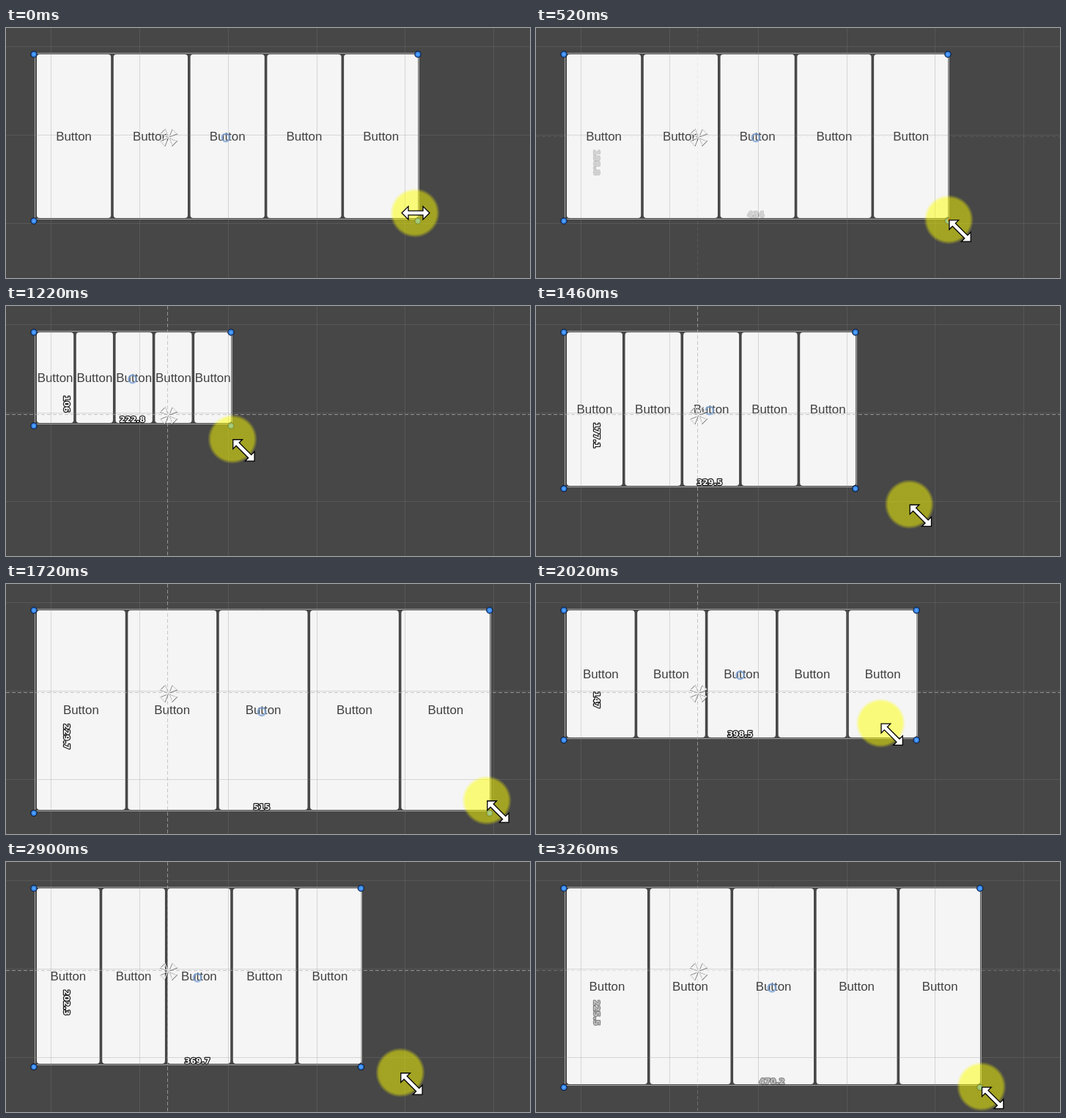
Write an HTML page with a canvas that moves like this. It is 715 px wide and 342 px high and loops after 3.3 s.

```html
<!DOCTYPE html>
<html lang="en">
<head>
<meta charset="utf-8">
<title>Resizing a row of buttons</title>
<style>
html, body { margin: 0; width: 100%; height: 100%; overflow: hidden; background: #474747; }
canvas { display: block; }
</style>
</head>
<body>
<canvas id="stage" width="715" height="342"></canvas>
<script>
const W = 715, H = 342, LOOP = 3300, STEP = 20;
const ctx = document.getElementById('stage').getContext('2d');

const LEFT = 38, TOP = 36, SCALE = 1.2075;
const PRESS = 500, LAG = 60;   // the panel follows the pointer a little late

// Pointer poses: time, x, y
const PATH = [
  [0, 558, 253], [200, 564, 263], [PRESS, 564, 263], [740, 495.4, 205],
  [1160, 309, 163], [1220, 309, 182], [1660, 661.9, 312.4], [1720, 656, 296],
  [2340, 252.9, 120.8], [2400, 243, 121], [2840, 486.4, 279.3], [2900, 538, 288],
  [3160, 607.8, 307.3]
];
const LAST = PATH.length - 1;

const clamp = v => Math.min(1, Math.max(0, v));

function slope(i, k) {
  if (i < 0 || i >= LAST) return 0;
  return (PATH[i + 1][k] - PATH[i][k]) / (PATH[i + 1][0] - PATH[i][0]);
}

function tangent(i, k) {
  const a = slope(i - 1, k), b = slope(i, k);
  return a * b > 0 ? 2 * a * b / (a + b) : 0;
}

// Smooth curve through the poses that never overshoots them
function pointer(t) {
  t = Math.min(t, PATH[LAST][0]);
  let i = 0;
  while (i < LAST - 1 && t >= PATH[i + 1][0]) i++;
  const span = PATH[i + 1][0] - PATH[i][0], u = (t - PATH[i][0]) / span, v = 1 - u;
  return [1, 2].map(k =>
    v * v * (1 + 2 * u) * PATH[i][k] + u * v * v * span * tangent(i, k) +
    u * u * (3 - 2 * u) * PATH[i + 1][k] - u * u * v * span * tangent(i + 1, k));
}

function stroke(color, width) {
  ctx.strokeStyle = color;
  ctx.lineWidth = width;
  ctx.stroke();
}

function fill(color) {
  ctx.fillStyle = color;
  ctx.fill();
}

function line(x1, y1, x2, y2, color) {
  ctx.beginPath();
  ctx.moveTo(x1, y1);
  ctx.lineTo(x2, y2);
  stroke(color, 1);
}

function circle(x, y, r) {
  ctx.beginPath();
  ctx.arc(x, y, r, 0, Math.PI * 2);
}

function glow(x, y, r1, color1, r2, color2) {
  const g = ctx.createRadialGradient(x, y, r1, x, y, r2);
  g.addColorStop(0, color1);
  g.addColorStop(1, color2);
  return g;
}

function wrap(text, width) {
  const lines = [''];
  for (const c of text) {
    const last = lines.length - 1;
    if (lines[last] && ctx.measureText(lines[last] + c).width > width + 1) lines.push(c);
    else lines[last] += c;
  }
  return lines;
}

function buttons(right, bottom) {
  const gap = 3.6, x0 = 42, y1 = Math.round(bottom) - 4;
  const pitch = (right + .3 - x0 + gap) / 5, width = pitch - gap;
  ctx.font = '16.9px "Liberation Sans", Arial, sans-serif';
  ctx.textAlign = 'center';
  ctx.textBaseline = 'alphabetic';
  const lines = wrap('Button', width);
  for (let i = 0; i < 5; i++) {
    const x = x0 + i * pitch;
    ctx.beginPath();
    ctx.roundRect(x, TOP, width, y1 - TOP, 4);
    fill('#f5f5f5');
    ctx.fillStyle = '#404040';
    lines.forEach((s, n) => ctx.fillText(s, x + width / 2,
      (TOP + y1) / 2 + 5.9 + (n - (lines.length - 1) / 2) * 19.4));
  }
}

function grid() {
  const color = 'rgba(128,128,128,.27)', cell = 120.85;
  for (let x = 61.5; x < W; x += cell) line(Math.floor(x) + .5, 0, Math.floor(x) + .5, H, color);
  for (let y = 25.5; y < H; y += cell) line(0, Math.floor(y) + .5, W, Math.floor(y) + .5, color);
}

function guides() {
  const color = 'rgba(180,180,180,.7)';
  ctx.setLineDash([5, 3]);
  line(220.5, 0, 220.5, H, color);
  line(0, 148.5, W, 148.5, color);
  ctx.setLineDash([]);
}

function petals(x, y, color) {
  ctx.save();
  ctx.translate(x, y);
  ctx.rotate(Math.PI / 4);
  ctx.beginPath();
  for (let i = 0; i < 4; i++) {
    ctx.moveTo(1, 0);
    ctx.lineTo(11.5, -4.6);
    ctx.lineTo(11.5, 4.6);
    ctx.closePath();
    ctx.rotate(Math.PI / 2);
  }
  stroke(color, 1.1);
  ctx.restore();
}

function size(length, x, y, angle) {
  const text = String(+(length / SCALE).toFixed(1));
  ctx.save();
  ctx.translate(x, y);
  ctx.rotate(angle);
  ctx.font = 'bold 11px "DejaVu Sans", sans-serif';
  ctx.textBaseline = 'middle';
  ctx.lineJoin = 'round';
  ctx.lineWidth = 2.4;
  ctx.strokeStyle = '#1c1c1c';
  ctx.strokeText(text, 0, 0);
  ctx.fillStyle = '#fff';
  ctx.fillText(text, 0, 0);
  ctx.restore();
}

function handle(x, y) {
  circle(x, y, 4.2);
  fill(glow(x, y, .5, '#5aa9ff', 4.5, '#1a67d2'));
  stroke('#0d1c38', 1.1);
}

// Double arrow centred on x, y
function arrow(x, y, half, angle) {
  const side = [[half, 0], [half - 9, 9], [half - 9, 2.9]];
  ctx.save();
  ctx.translate(x, y);
  ctx.rotate(angle);
  ctx.beginPath();
  for (const s of [1, -1]) {
    side.forEach(([px, py]) => ctx.lineTo(s * px, s * py));
    side.slice(1).reverse().forEach(([px, py]) => ctx.lineTo(-s * px, s * py));
  }
  ctx.closePath();
  fill('#fff');
  stroke('#000', 1.3);
  ctx.restore();
}

function cursor(x, y, diagonal) {
  circle(x, y, 34);
  fill(glow(x, y, 29, 'rgba(255,255,0,.5)', 34, 'rgba(255,255,0,0)'));
  if (diagonal) arrow(x + 15.4, y + 15.4, 20.7, Math.PI / 4);
  else arrow(x + 1, y, 19, 0);
}

function clickRing(t) {
  const age = (t - PRESS) / 420;
  if (age <= 0 || age >= 1) return;
  circle(564, 263, 29 * age);
  stroke(`rgba(200,20,20,${clamp(2.4 * (1 - age))})`, 1.6);
}

function draw(t) {
  const [x, y] = pointer(t);
  const [px, py] = pointer(t < PRESS + LAG ? PRESS : t - LAG);
  const right = px - 2, bottom = py + 1;
  const midX = (LEFT + right) / 2, midY = (TOP + bottom) / 2;
  const drag = clamp((t - PRESS) / 100) * (1 - .5 * clamp((t - 3190) / 70));

  ctx.fillStyle = '#474747';
  ctx.fillRect(0, 0, W, H);
  buttons(right, bottom);
  grid();
  ctx.globalAlpha = drag;
  guides();
  ctx.globalAlpha = 1;

  ctx.beginPath();
  ctx.rect(39.5, 34.5, Math.round(right) - 38, Math.round(bottom) - 37);
  stroke('#a6a6a6', 1);

  circle(midX, midY, 5.2);
  stroke('rgba(120,160,212,.75)', 2.6);
  petals(222, 149.8, 'rgba(50,50,50,.6)');
  petals(221.3, 149, '#f4f4f4');

  ctx.globalAlpha = drag;
  size(right - LEFT, midX, bottom - 7.5, 0);
  size(bottom - TOP, 82.3, midY + 34, Math.PI / 2);
  ctx.globalAlpha = 1;

  for (const hx of [LEFT, right]) for (const hy of [TOP, bottom]) handle(hx, hy);
  clickRing(t);
  cursor(x, y, t >= 120);
}

const start = performance.now();
function tick() {
  const t = Math.round((performance.now() - start) / STEP) * STEP;
  draw(t % LOOP);
  requestAnimationFrame(tick);
}
tick();
</script>
</body>
</html>
```
